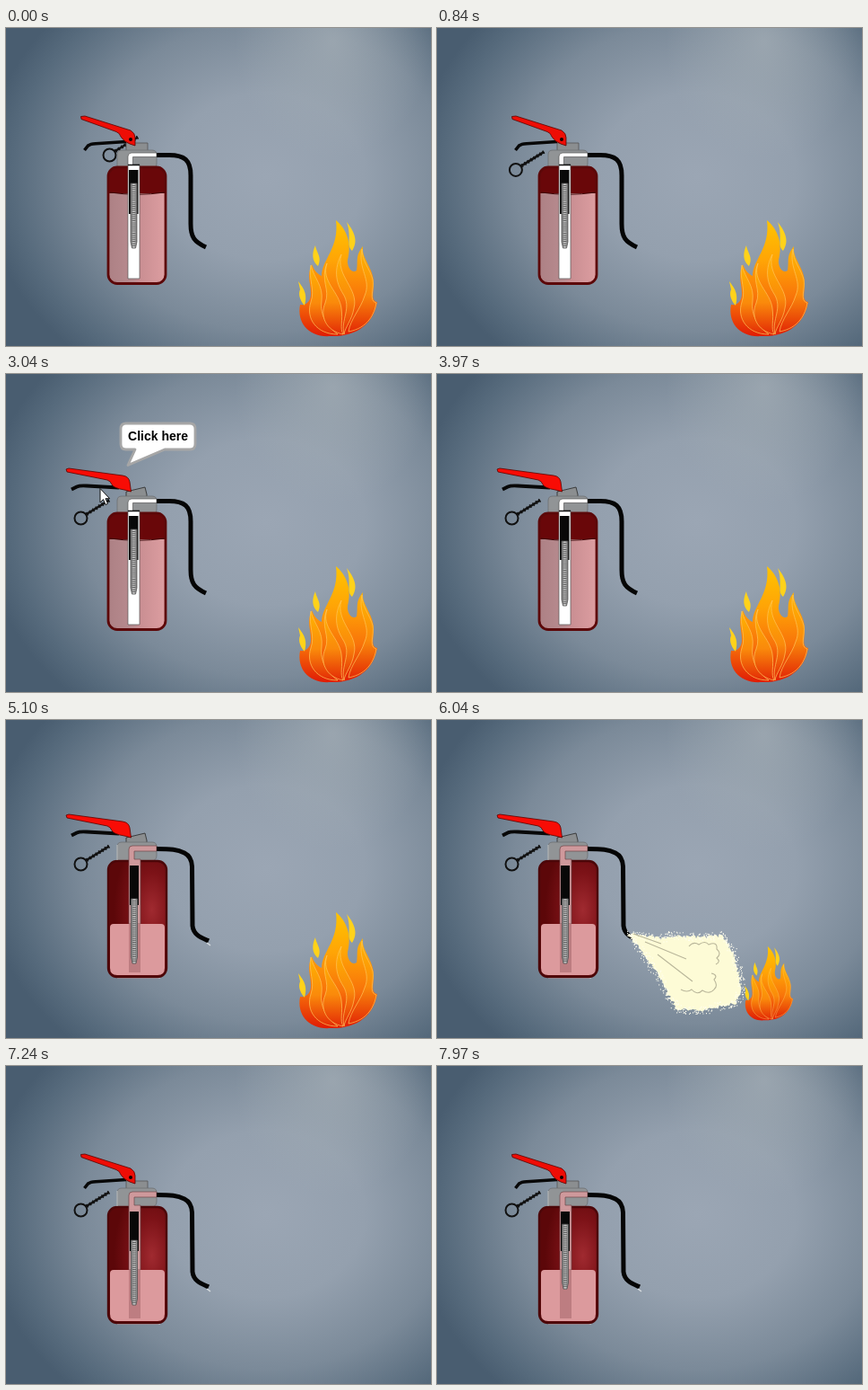
An HTML page that plays this animation: 474x354 px, repeating every 8 s.

```html
<!DOCTYPE html>
<html lang="en">
<head>
<meta charset="utf-8">
<title>Fire extinguisher</title>
<style>
  html, body { margin: 0; width: 100%; height: 100%; overflow: hidden; background: #5d6f80; }
  svg { display: block; width: 474px; height: 354px; }
  text { font: bold 14px "Liberation Sans", Arial, sans-serif; }
</style>
</head>
<body>
<svg viewBox="0 0 474 354" xmlns="http://www.w3.org/2000/svg">
  <defs>
    <radialGradient id="room" gradientUnits="userSpaceOnUse" cx="0" cy="0" r="1"
      gradientTransform="translate(290 165) scale(315 265)">
      <stop offset="0" stop-color="#9ba6b4"/>
      <stop offset=".35" stop-color="#94a0ae"/>
      <stop offset=".65" stop-color="#7b8a99"/>
      <stop offset=".9" stop-color="#566a7c"/>
      <stop offset="1.0" stop-color="#495d70"/>
    </radialGradient>
    <radialGradient id="glow" gradientUnits="userSpaceOnUse" cx="0" cy="0" r="1"
      gradientTransform="translate(365 15) scale(110 130)">
      <stop offset="0" stop-color="#a3adb5" stop-opacity=".75"/>
      <stop offset="1" stop-color="#a3adb5" stop-opacity="0"/>
    </radialGradient>
    <linearGradient id="liquid">
      <stop offset="0" stop-color="#ad8185"/>
      <stop offset=".45" stop-color="#b98c90"/>
      <stop offset=".55" stop-color="#c98e92"/>
      <stop offset="1" stop-color="#dc9da0"/>
    </linearGradient>
    <radialGradient id="shell" cx=".75" cy=".42" r=".65">
      <stop offset="0" stop-color="#a02a30"/>
      <stop offset=".5" stop-color="#7c1217"/>
      <stop offset="1" stop-color="#5c0709"/>
    </radialGradient>
    <linearGradient id="steel">
      <stop offset="0" stop-color="#6b6b6b"/>
      <stop offset=".5" stop-color="#d2d2d2"/>
      <stop offset="1" stop-color="#707070"/>
    </linearGradient>
    <linearGradient id="flame" x2="0" y2="1">
      <stop offset="0" stop-color="#ffc400"/>
      <stop offset=".35" stop-color="#ffa406"/>
      <stop offset=".68" stop-color="#f8720a"/>
      <stop offset="1" stop-color="#e01c05"/>
    </linearGradient>
    <linearGradient id="tongue" x2="0" y2="1">
      <stop offset="0" stop-color="#ffb400"/>
      <stop offset=".55" stop-color="#fa8a0b"/>
      <stop offset="1" stop-color="#e32b06"/>
    </linearGradient>
  </defs>

  <rect width="474" height="354" fill="url(#room)"/>
  <rect width="474" height="354" fill="url(#glow)"/>

  <g id="fire">
    <path fill="url(#flame)" d="M362 343C338 345 324 328 328 308C335 309 340 304 340 296C340 284 335 276 341 263C344 271 348 274 352 276C352 258 372 245 368 214C380 224 386 240 381 258C380 266 386 274 391 270C393 260 389 254 398 243C396 258 412 268 410 288C409 298 408 304 414 305C410 330 390 344 362 343Z"/>
    <g fill="#ffd21a">
      <path d="M326 282C331 289 337 295 333 309C327 302 326 296 328 291Z"/>
      <path d="M345 242C346 250 353 255 348 265C341 259 341 251 345 242Z"/>
      <path d="M380 216C387 225 394 236 386 248C379 242 386 233 380 216Z"/>
    </g>
    <g fill="url(#tongue)" stroke="#ffc65a" stroke-width=".7">
      <path d="M340 264C344 280 354 286 352 304C350 320 358 332 370 341C346 341 334 323 340 305C345 291 337 280 340 264Z"/>
      <path d="M358 262C351 282 372 294 374 312C376 326 372 334 376 341C356 337 350 320 356 306C362 291 350 281 358 262Z"/>
      <path d="M374 252C367 276 394 290 388 312C386 325 378 333 377 341C373 324 386 312 376 296C367 282 366 268 374 252Z"/>
      <path d="M397 246C392 268 408 280 400 298C396 312 384 324 382 338C404 334 411 318 413 306C404 304 411 290 409 280C406 268 397 260 397 246Z"/>
    </g>
  </g>

  <g id="pin" fill="none" stroke="#111">
    <circle cx="83.500" cy="160.500" r="7" stroke-width="2"/>
    <path d="M89 156.500L115 140.500" stroke-width="2.600"/>
    <path d="M90 156L115 140.500" stroke-width="4" stroke-dasharray="1.500 2.500"/>
  </g>

  <g id="capUp"><path d="M134 137V128H158V137Z" fill="#8b8e90" stroke="#555" stroke-width=".8"/></g>
  <g id="capDown"><path d="M134 137V131L155 126L157 134V137Z" fill="#8b8e90" stroke="#333" stroke-width=".9"/></g>
  <path d="M124 158V141Q124 136 129 136H163Q168 136 168 141V151Q168 157 160 158Z" fill="#919496" stroke="#6c6f71" stroke-width=".8"/>

  <g id="full">
    <rect x="114" y="155" width="64" height="129.500" rx="10" fill="#690709"/>
    <path d="M115 184H177V275Q177 284 168 284H124Q115 284 115 275Z" fill="url(#liquid)"/>
    <path d="M116 183Q146 187.500 177 183" fill="none" stroke="#3b0405"/>
    <rect x="114" y="155" width="64" height="129.500" rx="10" fill="none" stroke="#5c0809" stroke-width="2.800"/>
    <path d="M136 279V143Q136 139 140 139H168V143.500H141.500V152H149V279Z" fill="#fff" stroke="#555" stroke-width=".7"/>
    <path d="M136 152.500H149" stroke="#111" stroke-width="1.500"/>
    <path d="M137 158H147.500V207H137Z" fill="#080808"/>
    <path d="M168 141.500H182C199 141.500 206 147 206 164V218C206 233 210 238 223 244" fill="none" stroke="#050505" stroke-width="5"/>
  </g>

  <g id="low">
    <path d="M124 287H172" stroke="#d9d0d2"/>
    <rect x="114" y="157" width="65" height="129" rx="10" fill="url(#shell)" stroke="#4c0709" stroke-width="2.400"/>
    <path d="M116 231Q116 227 120 227H173Q177 227 177 231V276Q177 284 169 284H124Q116 284 116 276Z" fill="#dc9a9d"/>
    <path d="M137 227V144Q137 140 141 140H168V146H143V155H150V227Z" fill="#cf999c" stroke="#6d4548" stroke-width=".7"/>
    <path d="M137 227H150V281H137Z" fill="#bd7d81"/>
    <path d="M138 162H148V206H138Z" fill="#080808"/>
    <path d="M124 139V156" stroke="#c4c8ca"/>
    <path d="M168 143.500C184 143.500 191 144 199 148Q207 152 207.500 163L208 229C209 239 217 242 226 246" fill="none" stroke="#050505" stroke-width="5"/>
    <path d="M224 248L228 251" stroke="#d8dcdf" stroke-width="1.500"/>
  </g>

  <g id="rod">
    <path d="M139 173H146V238L144.500 245H140.500L139 238Z" fill="url(#steel)" stroke="#555" stroke-width=".8"/>
    <path d="M142.500 175V243" stroke="#5a5a5a" stroke-width="4" stroke-dasharray="1 1.300"/>
  </g>

  <g id="leverUp">
    <path d="M87.500 136L91.500 131Q94 129 100 128.700L134 126.500" fill="none" stroke="#080808" stroke-width="3.600"/>
    <path d="M83.500 98.500L88 98L139 114Q144 117 144 122V131L138 129Q131 126 128 121Q127 117 123 115.500L84 101.500Z" fill="#ee0d05" stroke="#5a0500" stroke-width=".8"/>
    <circle cx="139" cy="124" r="2" fill="#160000"/>
  </g>
  <g id="leverDown">
    <path d="M73 128.500L79 125.500Q82 124 90 124.500L126 126.500" fill="none" stroke="#080808" stroke-width="4"/>
    <path d="M67 106L70 105L130 113Q137 114 138 120L139.500 131L132 129Q120 127 118 123Q117 119.500 113 118L68 109Z" fill="#f80c05" stroke="#5a0500" stroke-width=".8"/>
  </g>

  <g id="spray">
    <path id="cloud" fill="#fdfbd6"/>
    <path id="specks" stroke="#fffef0" stroke-width="1.200"/>
    <g fill="none" stroke="#b9b69a" stroke-width="1.100">
      <path d="M219 238L250 249M232 247L278 266M246 261L285 291"/>
      <path d="M281 252Q286 246 292 250Q299 245 303 250Q313 246 312 255Q318 260 312 265Q317 269 311 272"/>
      <path d="M272 300Q279 304 284 300Q290 307 296 301Q304 306 309 300Q314 296 309 289Q314 284 306 282"/>
    </g>
  </g>

  <g id="bubble">
    <path d="M121 49H192Q198 49 198 55V72Q198 78 192 78H164L123 95.500L131 78H121Q115 78 115 72V55Q115 49 121 49Z" fill="#fff" stroke="#a6a6a6" stroke-width="2.800" stroke-linejoin="round"/>
    <text x="156.500" y="68" text-anchor="middle">Click here</text>
  </g>

  <path id="cursor" d="M.5 .5V16L4 12.600L6.500 18.500L9 17.300L6.500 11.700H11.200Z" fill="#fff" stroke="#111" stroke-width="1"/>
</svg>
<script>
const LOOP = 8000;
const el = id => document.getElementById(id);
const show = (id, on) => el(id).style.display = on ? '' : 'none';
const move = (id, x, y) => el(id).setAttribute('transform', `translate(${x} ${y})`);
const ramp = (t, a, b) => Math.min(1, Math.max(0, (t - a) / (b - a)));

// Ragged cloud edge with loose droplets around it
function drawSpray() {
  let seed = 7;
  const rnd = () => (seed = (seed * 16807) % 2147483647) / 2147483647;
  const jitter = r => (rnd() - .5) * r;
  const rim = [[214, 238], [248, 243], [260, 240], [292, 242], [318, 240], [328, 255],
    [336, 279], [340, 298], [334, 316], [314, 319], [295, 324], [268, 322],
    [256, 304], [247, 284], [232, 263]];
  let edge = '', dots = '';
  rim.forEach(([x, y], i) => {
    const [nx, ny] = rim[(i + 1) % rim.length];
    const n = Math.ceil(Math.hypot(nx - x, ny - y) / 2);
    for (let k = 0; k < n; k++) {
      const px = x + (nx - x) * k / n, py = y + (ny - y) * k / n;
      edge += `${edge ? 'L' : 'M'}${px + jitter(4)} ${py + jitter(4)}`;
      for (let d = 0; d < 3; d++) dots += `M${px + jitter(9)} ${py + jitter(9)}h1`;
    }
  });
  el('cloud').setAttribute('d', edge + 'Z');
  el('specks').setAttribute('d', dots);
}

function render(t) {
  const pressed = t >= 3040 && t < 7040;
  const spent = t >= 5100;

  const pull = ramp(t, 470, 900);
  move('pin', 32 * (1 - pull), -19 * (1 - pull));

  for (const part of ['lever', 'cap']) {
    show(part + 'Up', !pressed);
    show(part + 'Down', pressed);
  }
  show('full', !spent);
  show('low', spent);
  const drop = 26 * (ramp(t, 3440, 4500) - ramp(t, 7040, 8100));
  move('rod', spent ? .5 : 0, drop);

  show('bubble', t >= 970 && t < 3900);
  move('bubble', pressed ? 13 : 0, pressed ? 6 : 0);

  show('cursor', t >= 1840 && t < 3570);
  const enter = ramp(t, 1840, 2240), leave = ramp(t, 3170, 3570);
  move('cursor', 68 + 36.5 * (enter - leave), 336 - 209 * enter + 227 * leave);

  show('spray', t >= 5640 && t < 7040);
  show('fire', t < 6570);
  el('fire').setAttribute('transform', t < 6040 ? ''
    : 'translate(343 252) scale(.614 .638) translate(-326 -214)');
}

drawSpray();
const start = performance.now();
function tick() {
  render((performance.now() - start) % LOOP);
  requestAnimationFrame(tick);
}
tick();
</script>
</body>
</html>
```
